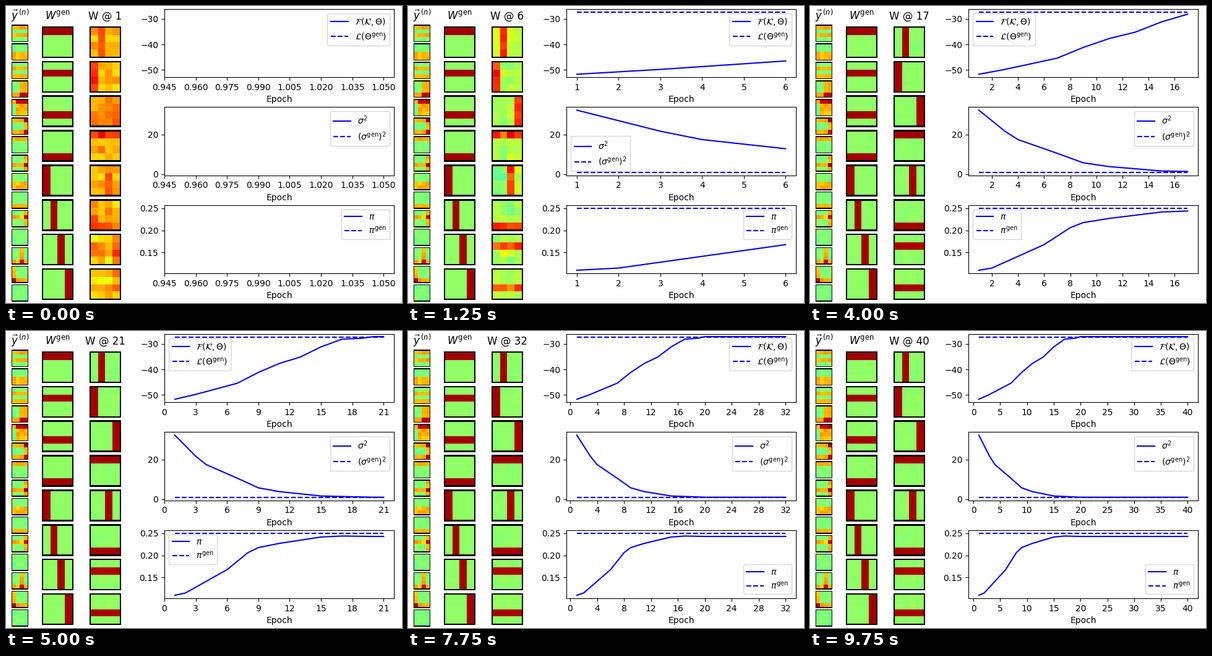
Recreate the animation shown at these times as a matplotlib script. Size 640 by 480 pixels, loop 10 s.

```python
import numpy as np
import matplotlib.pyplot as plt
from matplotlib.animation import FuncAnimation
from matplotlib.ticker import MaxNLocator

EPOCHS = 40
CELL, BORDER, GAP = 5, 1, 2
LOW, HIGH = 0.524, 0.965
JET = plt.get_cmap("jet")
rng = np.random.default_rng(4)


def bar(name):
    """4x4 mask of one bar, e.g. r0 is the top row, c3 the right column."""
    mask = np.zeros((4, 4))
    index = int(name[1])
    if name[0] == "r":
        mask[index] = 1
    else:
        mask[:, index] = 1
    return mask


def bar_tiles(names, low, high, noise=0):
    """One bar per tile, with noise shared along rows and columns."""
    masks = np.array([bar(n) for n in names])
    count = len(names)
    jitter = (rng.normal(size=(count, 4, 1)) + rng.normal(size=(count, 1, 4))
              + rng.normal(size=(count, 4, 4))) / np.sqrt(3)
    return low + (high - low) * masks + noise * jitter


def stack(tiles):
    """Column of black-framed tiles on white, as an RGB image."""
    box = 4 * CELL + 2 * BORDER
    pitch = box + GAP
    image = np.ones((len(tiles) * pitch + GAP, box + 2 * GAP, 3))
    for k, tile in enumerate(tiles):
        top = GAP + k * pitch
        image[top:top + box, GAP:GAP + box] = 0
        inner = np.kron(np.clip(tile, 0, HIGH), np.ones((CELL, CELL)))
        y, x = top + BORDER, GAP + BORDER
        image[y:y + 4 * CELL, x:x + 4 * CELL] = JET(inner)[..., :3]
    return image


# Data points: sums of bars plus noise
points = ["r0 r2", "r2 r3", "r1 r3", "c2 c3 r3", "r0 c1 c2 c3", "r0 r3 c3",
          "r0", "r2 c3", "r2 r3", "r3", "r1 c3", "", "c2 r3", "c0 r3", ""]
data = [0.505 + 0.215 * sum((bar(b) for b in p.split()), np.zeros((4, 4)))
        + rng.normal(0, 0.016, (4, 4)) for p in points]

# The learned bars sharpen from noise: epoch -> level, bar level, noise
true_bars = [kind + str(i) for kind in "rc" for i in range(4)]
learned_bars = ["c1", "c0", "c3", "r0", "c2", "r3", "r1", "r2"]
stages = {1: (0.71, 0.80, 0.045), 6: (0.56, 0.86, 0.035),
          11: (0.53, 0.935, 0.01), 17: (LOW, HIGH, 0.005)}
keys = [(e, bar_tiles(learned_bars, *s)) for e, s in stages.items()]
keys.append((EPOCHS, keys[-1][1]))


def weights(epoch):
    for (e0, w0), (e1, w1) in zip(keys, keys[1:]):
        if epoch <= e1:
            t = (epoch - e0) / (e1 - e0)
            return w0 + (w1 - w0) * t


fig = plt.figure(figsize=(6.4, 4.8), dpi=100)


def image_axes(left, width, title, tiles):
    ax = fig.add_axes([left, 0, width, 0.94])
    picture = ax.imshow(stack(tiles), interpolation="nearest")
    ax.axis("off")
    return picture, ax.set_title(title, pad=5.3)


image_axes(0.0, 0.07, r"$\vec{y}^{\,(n)}$", data)
image_axes(0.08, 0.1, r"$W^\mathrm{gen}$", bar_tiles(true_bars, LOW, HIGH))
w_image, w_title = image_axes(0.2, 0.1, "W @ 1", keys[0][1])

# bottom, y limits, labels, true value, key points (epoch, value)
panels = [
    (0.76, (-52.88, -26.15),
     (r"$\mathcal{F}(\mathcal{K},\Theta)$",
      r"$\mathcal{L}(\Theta^{\mathrm{gen}})$"), -27.4,
     [(1, -51.7), (3, -49.8), (7, -45.4), (9, -41.2), (11, -37.7),
      (13, -35.2), (15, -31.2), (17, -28.2), (19, -27.8), (20, -27.2)]),
    (0.43, (-0.57, 33.8),
     (r"$\sigma^2$", r"$(\sigma^{\mathrm{gen}})^2$"), 1.0,
     [(1, 32.2), (3, 21.6), (4, 17.4), (7, 10.5), (9, 5.7), (11, 3.8),
      (15, 1.6), (20, 0.97)]),
    (0.10, (0.1026, 0.2574),
     (r"$\pi$", r"$\pi^{\mathrm{gen}}$"), 0.25,
     [(1, 0.1095), (2, 0.1145), (6, 0.1675), (8, 0.206), (9, 0.2175),
      (11, 0.227), (15, 0.2415), (17, 0.2437), (20, 0.2428)]),
]

plots = []
for bottom, limits, labels, truth, points in panels:
    ax = fig.add_axes([0.4, bottom, 0.58, 0.23])
    curve, = ax.plot([], [], "b-", label=labels[0])
    level, = ax.plot([], [], "b--", label=labels[1])
    ax.set_ylim(limits)
    ax.set_xlabel("Epoch")
    ax.xaxis.set_major_locator(MaxNLocator(integer=True))
    ax.legend(loc="best")
    series = np.interp(np.arange(1, EPOCHS + 1), *zip(*points))
    plots.append((ax, curve, level, truth, series))


def draw(frame):
    epoch = frame + 1
    w_image.set_data(stack(weights(epoch)))
    w_title.set_text(f"W @ {epoch}")
    x = np.arange(1, epoch + 1)
    for ax, curve, level, truth, series in plots:
        curve.set_data(x, series[:epoch])
        level.set_data(x, np.full(epoch, truth))
        ax.relim()
        ax.autoscale_view(scaley=False)
    return []


anim = FuncAnimation(fig, draw, frames=EPOCHS, interval=250, repeat=True,
                     init_func=lambda: draw(0))
plt.show()
```
